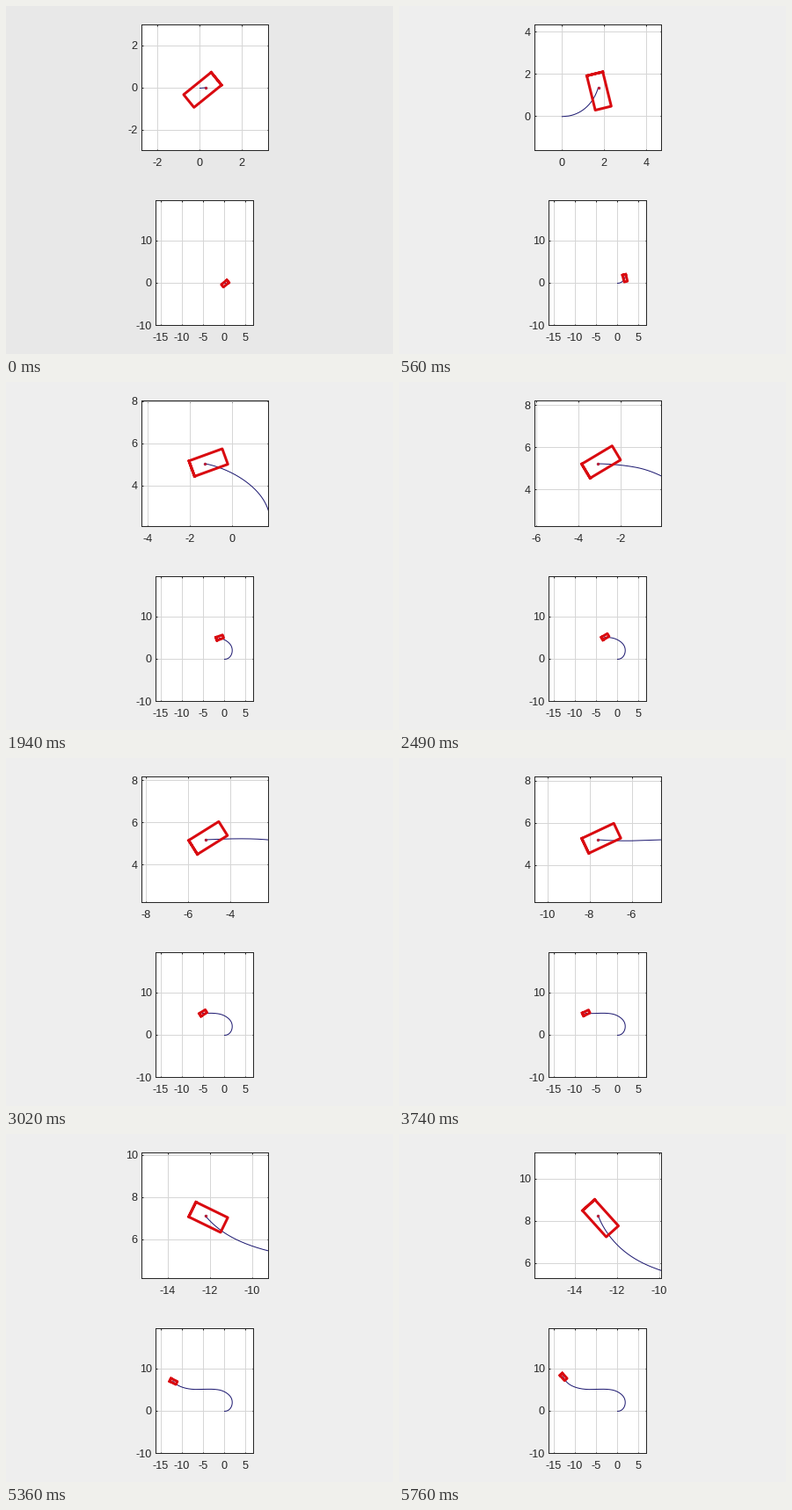
Write a matplotlib script that moves like this. It is 440x396 px and loops after 5830 ms.

```python
import numpy as np
import matplotlib.pyplot as plt
from matplotlib.animation import FuncAnimation
from matplotlib.ticker import MultipleLocator
from matplotlib.transforms import Affine2D

W, H, DPI = 440, 396, 88
PX = 72 / DPI                      # points per pixel
LOOP, INTERVAL, SLOTS = 5830, 22, 75
FRAMES = LOOP // INTERVAL

INK, GRID, RED, BLUE = "#262626", "#d6d6d6", "#d90a10", "#1c1870"
FIRST_BG, BG = "#e8e8e8", "#eeeeee"

plt.rcParams.update({
    "font.family": "Liberation Sans",
    "font.size": 12.6 * PX,
    "axes.unicode_minus": False,
    "axes.linewidth": PX,
    "axes.edgecolor": INK,
})

# Key poses: simulation step, position x + iy, heading in degrees
STEP = np.array([0, 11, 20, 31, 45, 54, 58])
POSITION = np.array([.25 + .02j, 1.58 + 3.146j, -1.29 + 5.06j, -5.21 + 5.19j,
                     -9.9 + 5.66j, -12.25 + 7.14j, -12.92 + 8.27j])
HEADING = np.array([39, 147, 200, 212, 188.5, 154, 132])
TURN_RATE = np.gradient(HEADING, STEP, edge_order=2)

# The vehicle drifts: it travels at a slip angle to its heading, slowing down
progress = STEP / STEP[-1]
slip = 31 - 9 * progress ** 3
VELOCITY = (.38 - .06 * progress) * np.exp(1j * np.radians(HEADING - slip))

FRONT, REAR, HALF_WIDTH = .68, -1.0, .39
BODY = np.array([FRONT + HALF_WIDTH * 1j, FRONT - HALF_WIDTH * 1j,
                 REAR - HALF_WIDTH * 1j, REAR + HALF_WIDTH * 1j])


def hermite(values, rates, at):
    """Cubic through the key poses with the given rates of change."""
    k = np.clip(np.searchsorted(STEP, at, side="right") - 1, 0, len(STEP) - 2)
    span = STEP[k + 1] - STEP[k]
    t = (at - STEP[k]) / span
    ease = t * t * (3 - 2 * t)
    return (values[k] + (values[k + 1] - values[k]) * ease
            + span * t * (1 - t) * ((1 - t) * rates[k] - t * rates[k + 1]))


def make_view(left, top, right, bottom, x_step, y_step):
    ax = fig.add_axes([left / W, 1 - bottom / H,
                       (right - left) / W, (bottom - top) / H])
    ax.xaxis.set_major_locator(MultipleLocator(x_step))
    ax.yaxis.set_major_locator(MultipleLocator(y_step))
    ax.set_axisbelow(True)
    ax.grid(color=GRID, linewidth=PX)
    ax.tick_params(direction="in", length=1.5 * PX, width=PX, color=INK,
                   labelcolor=INK, top=True, right=True)
    ax.tick_params(axis="x", pad=8.9 * PX)
    ax.tick_params(axis="y", pad=4.3 * PX)
    # Curves go through pixel centres, like the snapped grid lines
    centred = ax.transData + Affine2D().translate(.5, -.5)
    trail, = ax.plot([], [], color=BLUE, linewidth=PX, transform=centred)
    body, = ax.plot([], [], color=RED, linewidth=3 * PX, transform=centred,
                    solid_joinstyle="round")
    return ax, trail, body


fig = plt.figure(figsize=(W / DPI, H / DPI), dpi=DPI, facecolor=BG)
near, *near_lines = make_view(154, 21, 298, 164, 2, 2)
far, *far_lines = make_view(170, 221, 281, 363, 5, 10)
far.set_xlim(-16.25, 6.875)
far.set_ylim(-10, 19.58)
dot, = near.plot([], [], "o", markersize=2.8 * PX, color="#d0142d",
                 markeredgecolor="#981838", markeredgewidth=.6 * PX,
                 transform=near_lines[0].get_transform())

# Display slots that repeat the previous simulation step
HOLDS = np.floor(4.08 + 4.57 * np.arange(16))


def update(frame):
    slot = int((frame * INTERVAL + 20) * SLOTS / LOOP)
    step = slot - np.count_nonzero(HOLDS <= slot)

    place = hermite(POSITION, VELOCITY, step)
    angle = np.radians(hermite(HEADING, TURN_RATE, step))
    trail = np.r_[0, hermite(POSITION, VELOCITY, np.linspace(0, step, 250))]
    corners = place + BODY * np.exp(1j * angle)
    outline = np.r_[corners, corners[:2]]

    for path, body in (near_lines, far_lines):
        path.set_data(trail.real, trail.imag)
        body.set_data(outline.real, outline.imag)
    dot.set_data([place.real], [place.imag])
    near.set_xlim(place.real - 3, place.real + 3)
    near.set_ylim(place.imag - 2.98, place.imag + 2.98)
    fig.set_facecolor(BG if slot else FIRST_BG)
    return []


animation = FuncAnimation(fig, update, frames=FRAMES, interval=INTERVAL,
                          init_func=lambda: update(0), repeat=True,
                          repeat_delay=0, blit=False)
plt.show()
```
